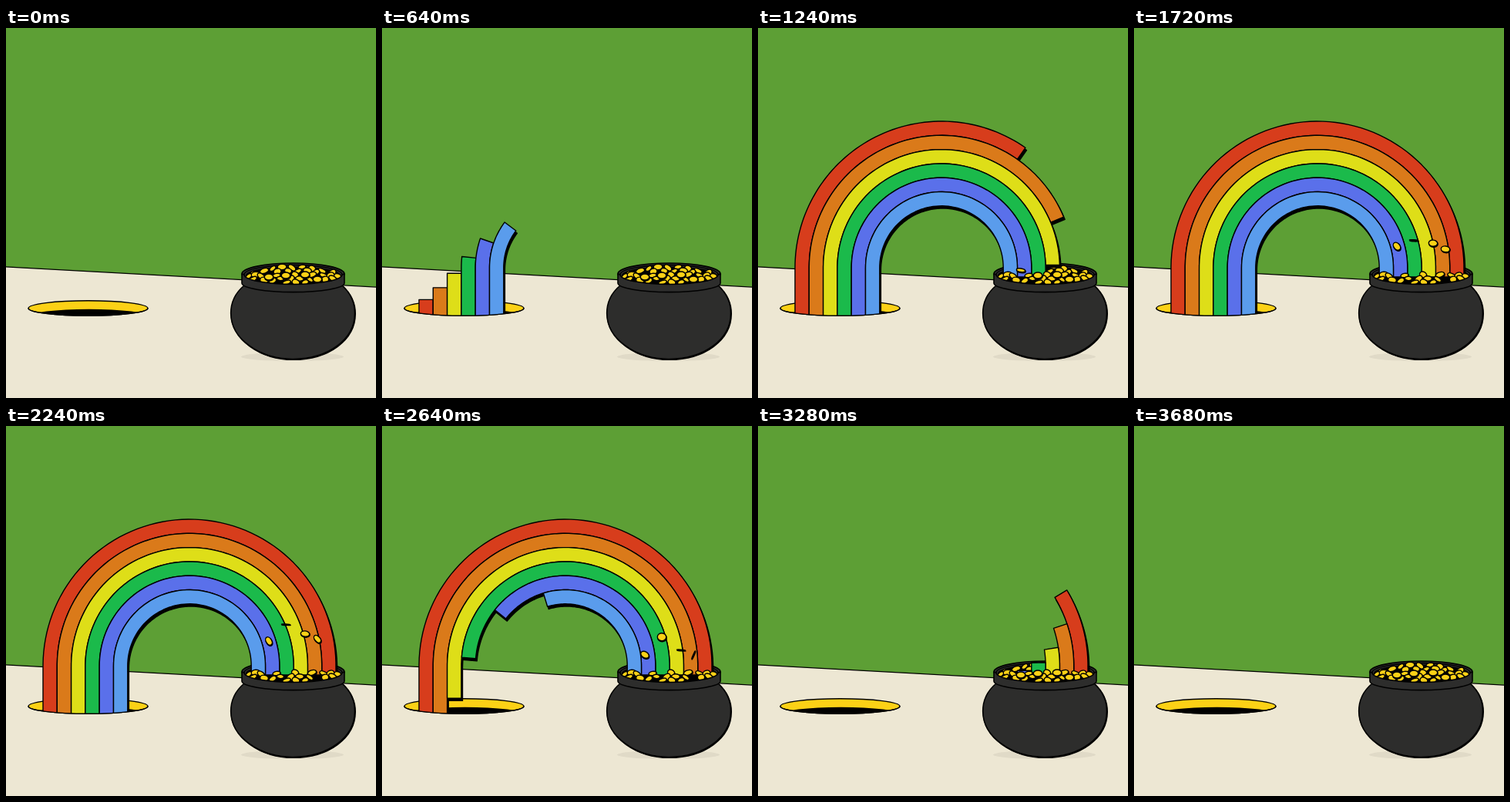
An HTML page with a canvas for the animation above (4000 ms loop, 480 by 480 pixels).

```html
<!DOCTYPE html>
<html lang="en">
<head>
<meta charset="utf-8">
<title>Rainbow and pot of gold</title>
<style>
  html, body { margin: 0; width: 100%; height: 100%; overflow: hidden; background: #5d9f35; }
  canvas { display: block; width: 480px; height: 480px; }
</style>
</head>
<body>
<canvas id="stage"></canvas>
<script>
const canvas = document.getElementById('stage');
const scale = window.devicePixelRatio || 1;
canvas.width = canvas.height = 480 * scale;
const ctx = canvas.getContext('2d');
ctx.scale(scale, scale);
ctx.lineJoin = 'round';

const LOOP = 4000, STEP = 40;
const INK = '#000', IRON = '#2d2d2c', GOLD = '#fcd116';
const CX = 238, CY = 311, LEG = 63, DROP = 12;
const OUTER = 190, WIDTH = 18.3;
const COLORS = ['#d73d1c', '#da7a1a', '#dede18', '#1bba4b', '#5a70ea', '#5a9cec'];
const STAGGER = 80;
const GROW = { start: 0, time: 1080 };
const SHRINK = { start: 2312, time: 1040 };
const HOLE = { x: 106.5, y: 363.5, rx: 77.5, ry: 9.8 };

const BACK_COINS = [
  [346, 312], [358, 310], [371, 311], [384, 310], [397, 312], [335, 315], [410, 315],
  [352, 316], [366, 315], [378, 316], [391, 315], [402, 317], [322, 318], [423, 318]
];
const FRONT_COINS = [
  [315, 322], [324, 320], [331, 322], [351, 321], [375, 320], [397, 320], [412, 321], [421, 321],
  [430, 322], [320, 326], [335, 327], [346, 328], [356, 325], [369, 326], [381, 325], [394, 326],
  [414, 326], [424, 325], [364, 330], [376, 330], [388, 330]
];
// Coins that hop when a band lands: rest place, hop time, height, half turns, tilt
const HOPS = [
  { x: 341, y: 323, start: 1150, time: 1800, lift: 46, flips: 7, tilt: u => 62 * Math.sin(Math.PI * u) },
  { x: 363, y: 321, start: 1310, time: 1760, lift: 64, flips: 6.6, tilt: () => 2 },
  { x: 388, y: 320, start: 1280, time: 1640, lift: 52, flips: 3, tilt: () => 5 },
  { x: 404, y: 326, start: 1300, time: 1620, lift: 51, flips: 3, tilt: u => 180 * u ** 2.4 }
];

const clamp = v => Math.min(1, Math.max(0, v));

// cubic-bezier(.265, 0, .246, 1)
function ease(x) {
  if (x <= 0 || x >= 1) return clamp(x);
  let lo = 0, hi = 1;
  for (let i = 0; i < 24; i++) {
    const s = (lo + hi) / 2, q = 1 - s;
    if (3 * q * q * s * 0.265 + 3 * q * s * s * 0.246 + s ** 3 < x) lo = s; else hi = s;
  }
  return 3 * lo * lo - 2 * lo ** 3;
}

function paint(fill, stroke, width = 1.4) {
  if (fill) { ctx.fillStyle = fill; ctx.fill(); }
  if (stroke) { ctx.strokeStyle = stroke; ctx.lineWidth = width; ctx.stroke(); }
}

function oval(x, y, rx, ry, fill, stroke, width, turn = 0) {
  ctx.beginPath();
  ctx.ellipse(x, y, rx, ry, turn, 0, Math.PI * 2);
  paint(fill, stroke, width);
}

function onBand(d, mid, r) {
  if (d < LEG) return [CX - r, CY + LEG - d];
  const a = (d - LEG) / mid;
  if (a < Math.PI) return [CX - r * Math.cos(a), CY - r * Math.sin(a)];
  return [CX + r, CY + (a - Math.PI) * mid];
}

function bandPath({ from, to, mid }) {
  const n = 80, half = WIDTH / 2;
  ctx.beginPath();
  for (let i = 0; i <= n; i++) ctx.lineTo(...onBand(from + (to - from) * i / n, mid, mid + half));
  for (let i = n; i >= 0; i--) ctx.lineTo(...onBand(from + (to - from) * i / n, mid, mid - half));
  ctx.closePath();
}

function bandsAt(t) {
  return COLORS.map((color, i) => {
    const mid = OUTER - WIDTH * (i + 0.5), total = Math.PI * mid + LEG + DROP;
    const local = t - (COLORS.length - 1 - i) * STAGGER;
    const head = 1 - ease(1 - (local - GROW.start) / GROW.time);
    const tail = ease((local - SHRINK.start) / SHRINK.time);
    return { color, mid, from: tail * total, to: head * total };
  }).filter(b => b.to - b.from > 0.5);
}

function drawRainbow(t) {
  const bands = bandsAt(t);
  ctx.save();
  ctx.beginPath();
  ctx.moveTo(0, 0);
  ctx.lineTo(480, 0);
  ctx.lineTo(480, HOLE.y);
  ctx.ellipse(HOLE.x, HOLE.y, HOLE.rx, HOLE.ry, 0, 0, Math.PI);
  ctx.lineTo(0, HOLE.y);
  ctx.clip();
  ctx.save();
  ctx.translate(1.6, 3.2);
  for (const b of bands) { bandPath(b); paint(INK, INK); }
  ctx.restore();
  for (const b of bands) { bandPath(b); paint(b.color, INK); }
  ctx.restore();
  ctx.beginPath();
  ctx.ellipse(HOLE.x, HOLE.y, HOLE.rx, HOLE.ry, 0, 0, Math.PI);
  paint(null, INK);
}

function coin(x, y, rx, ry, turn) {
  oval(x + 0.5, y + 1, rx, ry, INK, INK, 1.5, turn);
  oval(x, y, rx, ry, ry > 1 ? GOLD : INK, INK, 1.4, turn);
}

function pile(list) {
  list.forEach(([x, y], i) =>
    coin(x, y, 4.6 + (i * 7 % 4) * 0.4, 2.6 + (i * 5 % 3) * 0.6, ((i * 37 % 80) - 40) * Math.PI / 180));
}

function drawHop(c, t) {
  const u = clamp((t - c.start) / c.time);
  const resting = u === 0 || u === 1;
  const ry = resting ? 4 : Math.max(0.3, 5 * Math.abs(Math.cos(Math.PI * c.flips * u)));
  coin(c.x, c.y - c.lift * 4 * u * (1 - u), 5.7, ry, resting ? 0 : c.tilt(u) * Math.PI / 180);
}

function drawRoom() {
  ctx.fillStyle = '#5d9f35';
  ctx.fillRect(0, 0, 480, 480);
  ctx.beginPath();
  ctx.moveTo(-3, 309.8);
  ctx.lineTo(483, 336.2);
  ctx.lineTo(483, 483);
  ctx.lineTo(-3, 483);
  ctx.closePath();
  paint('#ede7d3', INK, 1.3);

  const { x, y, rx, ry } = HOLE;
  oval(x, y, rx, ry, GOLD);
  ctx.save();
  ctx.clip();
  oval(x + 1, y + 11, rx, ry, INK);
  ctx.restore();
  oval(x, y, rx, ry, null, INK);
}

function potBody() {
  ctx.beginPath();
  ctx.moveTo(309, 334);
  ctx.bezierCurveTo(297, 344, 291.7, 357, 291.7, 370);
  ctx.bezierCurveTo(291.7, 404, 330, 429.5, 372, 429.5);
  ctx.bezierCurveTo(418, 429.5, 452.5, 404, 452.5, 370);
  ctx.bezierCurveTo(452.5, 357, 447, 344, 436, 334);
  ctx.closePath();
}

function drawPotBack() {
  oval(371.5, 426.5, 66.5, 5.5, '#e0dac7');
  ctx.save();
  ctx.translate(0.7, 0.8);
  potBody();
  paint(INK, INK, 1.6);
  ctx.restore();
  potBody();
  paint(IRON, INK, 1.6);
  oval(372.5, 319, 66.5, 14, IRON, INK, 1.6);
  oval(372.5, 320, 63.5, 12.5, IRON, INK, 1.3);
  oval(372.5, 321, 61.5, 11.5, INK);
  pile(BACK_COINS);
}

function drawPotFront() {
  ctx.beginPath();
  ctx.moveTo(306, 319);
  ctx.lineTo(306, 331);
  ctx.ellipse(372.5, 331, 66.5, 11.6, 0, Math.PI, 0, true);
  ctx.lineTo(439, 319);
  ctx.lineTo(436, 320);
  ctx.ellipse(372.5, 320, 63.5, 12.5, 0, 0, Math.PI);
  ctx.closePath();
  paint(IRON, INK, 1.6);
}

function draw(t) {
  drawRoom();
  drawPotBack();
  drawRainbow(t);
  pile(FRONT_COINS);
  HOPS.forEach(c => drawHop(c, t));
  drawPotFront();
}

const begin = performance.now();
function tick() {
  const t = (performance.now() - begin) % LOOP;
  draw(Math.floor(t / STEP) * STEP);
  requestAnimationFrame(tick);
}
tick();
</script>
</body>
</html>
```
